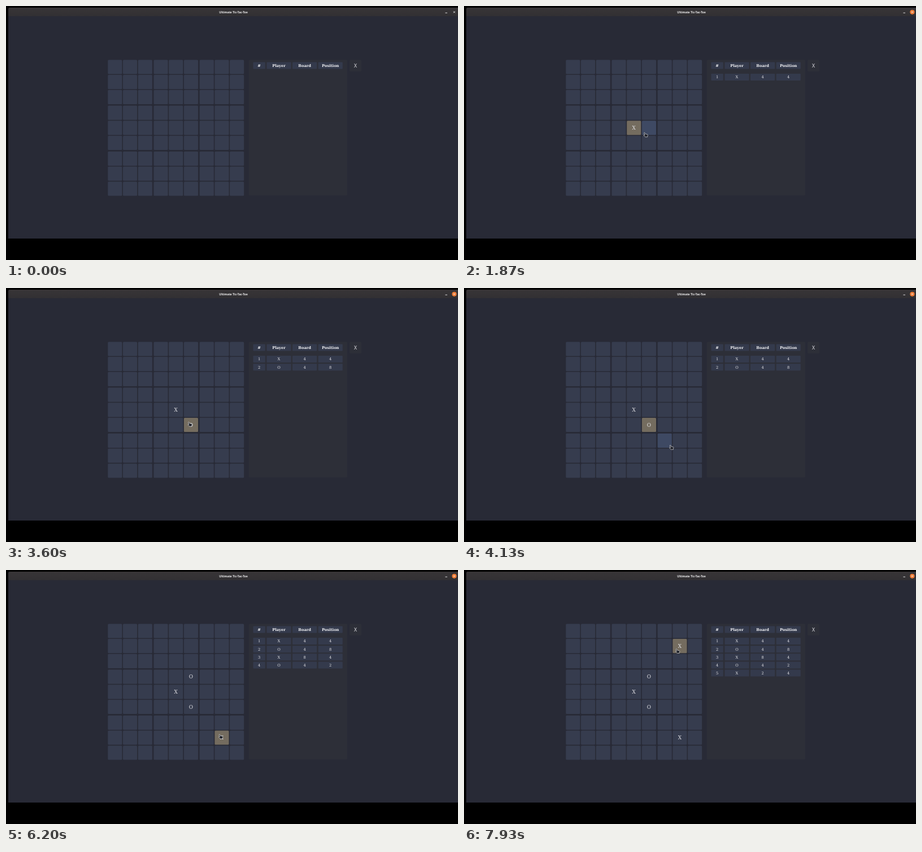
Write an HTML page that moves like this. It is 800 px wide and 450 px high and loops after 8 s.

```html
<!DOCTYPE html>
<html lang="en">
<head>
<meta charset="utf-8">
<title>Ultimate Tic-Tac-Toe</title>
<style>
  html, body { margin: 0; width: 100%; height: 100%; overflow: hidden; background: #000; }
  svg { display: block; width: 100vw; height: 100vh; }
  text { text-anchor: middle; fill: #e4e4e8; font: 6.7px "DejaVu Serif", serif; }
  .head { font-weight: bold; fill: #f6f6f8; }
  .mark { font-size: 8.8px; }
  .turn { font: 8.6px "Noto Sans", sans-serif; }
  .title { font: bold 5.05px "Noto Sans", sans-serif; fill: #f4f4f4; }
  #cursor path { fill: #20222a; stroke: #e0e0e0; stroke-width: .7; stroke-linejoin: round; }
</style>
</head>
<body>
<svg viewBox="0 0 800 450">
  <defs>
    <linearGradient id="bar" x2="0" y2="1">
      <stop stop-color="#383537"/><stop offset="1" stop-color="#323033"/>
    </linearGradient>
  </defs>
  <rect width="800" height="450" fill="#000"/>
  <path d="M4 412V6Q4 3 7 3H800V412Z" fill="#282a36"/>
  <path d="M4 18V6Q4 3 7 3H800V18Z" fill="url(#bar)"/>
  <text class="title" x="402.5" y="12.7">Ultimate Tic-Tac-Toe</text>
  <path d="M777.4 12.2h3.6" stroke="#eee" stroke-width=".9"/>
  <circle id="close" cx="793.4" cy="10.8" r="4.1" fill="#ee7a33"/>
  <path d="M791.9 9.3l3 3m0-3l-3 3" stroke="#f4f4f4" stroke-width=".9"/>
  <rect x="429.5" y="95.5" width="174.5" height="240" rx="1.5" fill="#2d2f38"/>
  <rect x="608" y="95.5" width="21" height="20.5" rx="1.5" fill="#2d2f38"/>
  <text class="turn" x="618.5" y="108.6">X</text>
  <g id="cells"></g>
  <g id="table"></g>
  <g id="marks"></g>
  <g id="cursor">
    <path id="hand" d="M-3-3.2Q-2.4-4.2-1.5-3.4L-.2-1.2 2.8-.7Q4-.3 3.8 1.4L3.2 2.8V4H-.6L-3.4 1.5Q-3.8.3-2.6.4L-1.6.8Z"/>
    <path id="arrow" d="M-3-4.2V3.2L-1.2 1.6 0 4.2 1.2 3.6.1 1.2 2.4.9Z"/>
  </g>
</svg>
<script>
const LOOP = 8000, STEP = 1000 / 15, FADE = 200;
const BASE = [54, 60, 78], HOVER = [62, 73, 99], LAST = [116, 108, 95];
const SIZE = 25.1, BOARD_RIGHT = 423;

// Each move is played in the small board named by the previous position.
const moves = [
  { t: 1400, pos: 4 }, { t: 3067, pos: 8 }, { t: 4733, pos: 4 },
  { t: 6200, pos: 2 }, { t: 7733, pos: 4 }
];

// Pointer strokes, each easing out into its end point.
const entry = { x: 651, y: 310 };
const strokes = [
  { from: 267, to: 800, x: 330.5, y: 240 },
  { from: 800, to: 1000, x: 309, y: 223 },
  { from: 1600, to: 1867, x: 321.5, y: 228 },
  { from: 2133, to: 2333, x: 319, y: 210 },
  { from: 2333, to: 2600, x: 316.5, y: 234 },
  { from: 3333, to: 3867, x: 328.5, y: 243.5 },
  { from: 3867, to: 4400, x: 380, y: 295 },
  { from: 6400, to: 7000, x: 381, y: 154 },
  { from: 7000, to: 7200, x: 378, y: 143.5 }
];

const $ = id => document.getElementById(id);
const clamp = v => Math.max(0, Math.min(1, v));
const lerp = (a, b, k) => a + (b - a) * k;
const mix = (a, b, k) => a.map((v, i) => lerp(v, b[i], k));
const easeOut = k => 1 - (1 - k) ** 2;
const show = (el, on) => el.setAttribute('visibility', on ? 'visible' : 'hidden');

function add(parent, tag, attrs, label) {
  const el = document.createElementNS('http://www.w3.org/2000/svg', tag);
  for (const k in attrs) el.setAttribute(k, attrs[k]);
  if (label !== undefined) el.textContent = label;
  parent.appendChild(el);
  return el;
}

const offset = i => Math.floor(i / 3) * 81.2 + (i % 3) * 26.7;
const cells = Array.from({ length: 81 }, (_, i) => {
  const x = 180.3 + offset(i % 9), y = 95.4 + offset(Math.floor(i / 9));
  const el = add($('cells'), 'rect', { x, y, width: SIZE, height: SIZE, rx: 1.5 });
  return { x, y, el };
});

function tableRow(y, values, cls) {
  const g = add($('table'), 'g', {});
  values.forEach((v, i) => {
    const x = i ? 415.8 + i * 45.6 : 437.4, width = i ? 43.2 : 21.4;
    add(g, 'rect', { x, y: y - 6, width, height: 12, rx: 1.2, fill: '#343a4c' });
    add(g, 'text', { x: x + width / 2, y: y + 2.4, class: cls }, v);
  });
  return g;
}
tableRow(105.5, ['#', 'Player', 'Board', 'Position'], 'head');

moves.forEach((m, i) => {
  const who = i % 2 ? 'O' : 'X';
  const board = i ? moves[i - 1].pos : 4;
  const col = board % 3 * 3 + m.pos % 3;
  const row = Math.floor(board / 3) * 3 + Math.floor(m.pos / 3);
  m.cell = cells[row * 9 + col];
  m.row = tableRow(126 + i * 14.15, [i + 1, who, board, m.pos], 'item');
  m.mark = add($('marks'), 'text', {
    x: m.cell.x + SIZE / 2, y: m.cell.y + SIZE / 2 + 3.2, class: 'mark'
  }, who);
});

function pointerAt(t) {
  let p = entry;
  for (const s of strokes) {
    const k = easeOut(clamp((t - s.from) / (s.to - s.from)));
    p = { x: lerp(p.x, s.x, k), y: lerp(p.y, s.y, k) };
  }
  return p;
}

function isOver(cell, p) {
  const dx = p.x - 1.4 - cell.x, dy = p.y - 3.6 - cell.y;
  return dx >= 0 && dx <= SIZE && dy >= 0 && dy <= SIZE;
}

function render(time) {
  const t = Math.floor(time % LOOP / STEP + 0.1) * STEP + 0.5;
  const p = pointerAt(t);
  $('cursor').setAttribute('transform', `translate(${p.x} ${p.y})`);
  $('cursor').style.display = t >= strokes[0].from ? '' : 'none';
  show($('hand'), p.x < BOARD_RIGHT);
  show($('arrow'), p.x >= BOARD_RIGHT);

  // Hover fades with the share of recent steps spent over a cell.
  const recent = [0, 1, 2].map(i => pointerAt(t - i * STEP));
  for (const c of cells) {
    const share = recent.filter(q => isOver(c, q)).length / recent.length;
    c.color = mix(BASE, HOVER, share ** 2);
  }
  moves.forEach((m, i) => {
    const next = moves[i + 1];
    const rise = clamp((t - m.t) / FADE);
    const fall = next ? clamp((t - next.t) / FADE) : 0;
    m.cell.color = mix(m.cell.color, LAST, rise * (1 - fall));
    show(m.row, t >= m.t);
    show(m.mark, t >= m.t);
  });
  for (const c of cells) c.el.setAttribute('fill', `rgb(${c.color.map(Math.round)})`);
  show($('close'), t >= moves[0].t);
}

const start = performance.now();
function frame() {
  render(performance.now() - start);
  requestAnimationFrame(frame);
}
frame();
</script>
</body>
</html>
```
